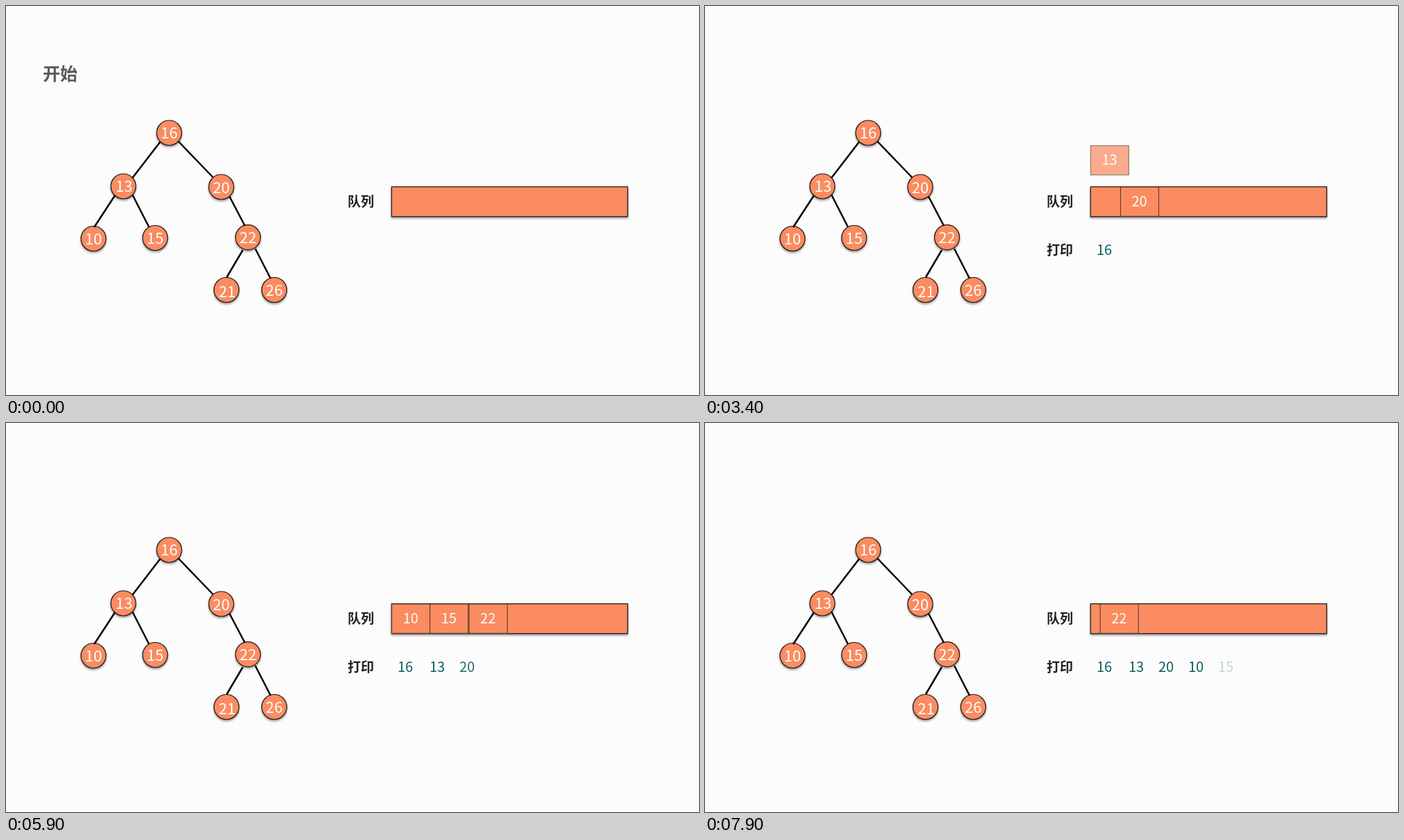
These frames come from a looping animation (998x561 px, 8 s). An HTML page:

```html
<!DOCTYPE html>
<html lang="zh-CN">
<head>
<meta charset="utf-8">
<title>层序遍历</title>
<style>
  html, body { margin: 0; width: 100%; height: 100%; overflow: hidden; background: #fcfcfc; }
  svg { display: block; width: 998px; height: 561px; }
  text { font-family: "Noto Sans CJK SC", "Noto Sans CJK", "Noto Sans", sans-serif; }
  .shape { fill: #fb8c61; stroke: #1c1512; stroke-width: 1.2; }
  .shadow { filter: drop-shadow(0 2.5px 1.8px rgba(0, 0, 0, .42)); }
  .cell rect { fill: #fb8c61; stroke: #49352d; stroke-width: 1; }
  .white { fill: #fff; text-anchor: middle; font-weight: 500; }
  .print { fill: #0d5c5c; text-anchor: middle; font-size: 20px; }
  .label { fill: #222; font-size: 19px; font-weight: 600; }
  .title { fill: #595959; font-size: 25px; font-weight: 600; }
  .edge { stroke: #000; stroke-width: 2.5; }
</style>
</head>
<body>
<svg viewBox="0 0 998 561"></svg>
<script>
const LOOP = 8000, STEP = 100, DURATION = 750, RISE = 276;
const SLOTS = [555, 610, 665];
const svg = document.querySelector('svg');

function add(tag, attrs, content = '', parent = svg) {
  const el = document.createElementNS('http://www.w3.org/2000/svg', tag);
  for (const name in attrs) el.setAttribute(name, attrs[name]);
  el.textContent = content;
  return parent.appendChild(el);
}

// Tree nodes: value, circle centre, text offset
const nodes = [
  [16, 235, 183, 0, 0], [13, 169, 260, 1, 0], [20, 310, 261, 0, 1], [10, 126, 335.5, 0, 0],
  [15, 214.8, 334.5, 0, 0], [22, 348.5, 333.7, 0, 0], [21, 317.5, 409.5, 1, 2], [26, 386.3, 409.5, 0, 0]
];
for (const [value, x, y, dx, dy] of nodes) {
  add('circle', { class: 'shape shadow', cx: x, cy: y, r: 18 });
  add('text', { class: 'white', x: x + dx, y: y + dy + 8.2, 'font-size': 22 }, value);
}
const edges = [
  [222, 196, 182, 248], [248, 195, 298, 247], [157, 273, 127, 319], [182, 272, 206, 319],
  [322, 275, 344, 317], [341, 352, 318, 391], [359, 350, 381, 393]
];
for (const [x1, y1, x2, y2] of edges) add('line', { class: 'edge', x1, y1, x2, y2 });

const title = add('text', { class: 'title', x: 53, y: 106.5 }, '开始');
add('text', { class: 'label', x: 492, y: 288.5 }, '队列');
const printLabel = add('text', { class: 'label', x: 492, y: 358.5 }, '打印');
add('rect', { class: 'shape shadow', x: 555.3, y: 260.7, width: 340, height: 43, 'stroke-width': 1 });

// Queue cells: moves are [start time, from x, to x]; leave is when the cell is taken out and printed
const cells = [
  { value: 16, moves: [[345, 1010, SLOTS[0]]], leave: 1296, printX: 575 },
  { value: 13, moves: [[2241, 1001, SLOTS[0]]], leave: 3296, printX: 621 },
  { value: 20, moves: [[2241, 1168, SLOTS[1]], [3296, SLOTS[1], SLOTS[0]]], leave: 5196, printX: 664 },
  { value: 10, moves: [[4250, 1011, SLOTS[1]], [5196, SLOTS[1], SLOTS[0]]], leave: 6396, printX: 707 },
  { value: 15, moves: [[4250, 1088, SLOTS[2]], [5196, SLOTS[2], SLOTS[1]], [6396, SLOTS[1], SLOTS[0]]],
    leave: 7496, printX: 750 },
  { value: 22, moves: [[5196, 1020, SLOTS[2]], [6396, SLOTS[2], SLOTS[1]], [7496, SLOTS[1], SLOTS[0]]],
    leave: Infinity }
];
for (const cell of cells) {
  cell.group = add('g', { class: 'cell' });
  add('rect', { x: .3, y: 261, width: 55, height: 42.3 }, '', cell.group);
  add('text', { class: 'white', x: 27.5, y: 288.7, 'font-size': 20 }, cell.value, cell.group);
  if (cell.printX) cell.print = add('text', { class: 'print', x: cell.printX, y: 359.2 }, cell.value);
}

const clamp = v => Math.max(0, Math.min(1, v));
const progress = (time, start) => clamp((time - start) / DURATION);
const easeOut = t => Math.sin(t * Math.PI / 2);
const fadeOut = t => clamp(1 - 2 * t);
const fadeIn = t => clamp((t - .4) / .6);

function draw(time) {
  title.setAttribute('opacity', fadeOut(progress(time, 345)));
  printLabel.setAttribute('opacity', fadeIn(progress(time, 1296)));
  for (const { moves, leave, group, print } of cells) {
    const [start, from, to] = moves.findLast(move => time >= move[0]) || [0, 1200, 1200];
    const out = progress(time, leave);
    const x = from + (to - from) * easeOut(progress(time, start));
    group.setAttribute('transform', `translate(${x} ${-RISE * easeOut(out)})`);
    group.setAttribute('opacity', fadeOut(out));
    if (print) print.setAttribute('opacity', fadeIn(out));
  }
}

function tick() {
  draw(Math.floor(performance.now() % LOOP / STEP) * STEP);
  requestAnimationFrame(tick);
}
tick();
</script>
</body>
</html>
```
